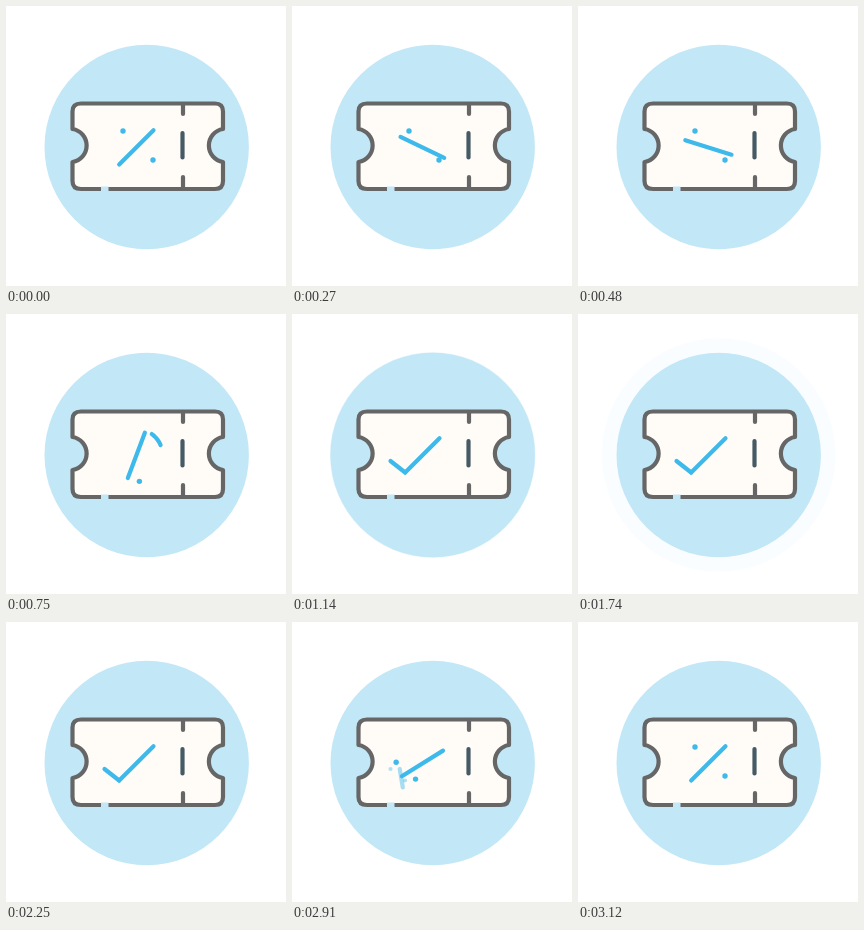
An HTML page for the animation above (4500 ms loop, 280x280 px).

```html
<!DOCTYPE html>
<html lang="en">
<head>
<meta charset="utf-8">
<title>Coupon check</title>
<style>
  html, body { margin: 0; height: 100%; overflow: hidden; background: #fff; }
  svg { display: block; width: 100vw; height: 100vh; }
  .disc { fill: #c2e7f7; }
  .ticket { fill: #fffcf7; stroke: #666; }
  .ink { fill: none; stroke: #3db9ec; }
  path { stroke-width: 4.2; stroke-linecap: round; stroke-linejoin: round; }
  .dot { fill: #3db9ec; }
</style>
</head>
<body>
<svg viewBox="0 0 280 280">
  <circle class="disc ripple" cx="140.7" cy="141"/>
  <circle class="disc ripple" cx="140.7" cy="141"/>
  <circle class="disc" cx="140.7" cy="141" r="102.2"/>
  <path class="ticket" d="M75 97.5H209Q217 97.5 217 105.5V123A16.7 16.7 0 0 0 217 156V175Q217 183 209 183H75Q66.5 183 66.5 175V156A16.7 16.7 0 0 0 66.5 123V105.5Q66.5 97.5 75 97.5Z"/>
  <path class="ticket" d="M177 98V108M177 171V182"/>
  <path d="M176.5 127V151.5" stroke="#455a64"/>
  <rect x="95" y="180.5" width="7.5" height="5" fill="#c2e7f7"/>
  <g id="ghosts"><circle class="dot" cx="98.5" cy="147" r="2.1"/><circle class="dot" cx="113" cy="158.5" r="2.1"/></g>
  <path id="leg" class="ink"/>
  <path id="slash" class="ink" d="M113.2 158.5L147.5 124.3"/>
  <circle class="dot mark" r="2.7"/>
  <circle class="dot mark" r="2.7"/>
</svg>
<script>
const LOOP = 4500, CX = 130.4, CY = 141.4;
const $ = s => document.querySelector(s);
const ripples = document.querySelectorAll('.ripple');
const marks = document.querySelectorAll('.mark');
const ghosts = $('#ghosts'), leg = $('#leg'), slash = $('#slash');

const lerp = (a, b, p) => a + (b - a) * p;
const mix = (a, b, p) => [lerp(a[0], b[0], p), lerp(a[1], b[1], p)];
const span = (t, a, b) => Math.min(1, Math.max(0, (t - a) / (b - a)));
const inOut = p => p < .5 ? 2 * p * p : 1 - 2 * (1 - p) ** 2;
const polar = (r, deg) => {
  const a = deg * Math.PI / 180;
  return [CX + r * Math.cos(a), CY + r * Math.sin(a)];
};

// cubic-bezier(.4, 0, .2, 1)
function swift(x) {
  let lo = 0, hi = 1, s = .5;
  for (let i = 0; i < 24; i++) {
    s = (lo + hi) / 2;
    const bx = 1.2 * (1 - s) ** 2 * s + .6 * (1 - s) * s * s + s ** 3;
    if (bx < x) lo = s; else hi = s;
  }
  return 3 * s * s - 2 * s ** 3;
}

const dotA = [117, 125], dotB = [147, 154];
const tip = [98.5, 147], corner = [113.2, 158.5];

function place(dot, [x, y], visible) {
  dot.setAttribute('cx', x);
  dot.setAttribute('cy', y);
  dot.setAttribute('opacity', visible ? 1 : 0);
}

// The upper dot swings round the slash, stretching into the short stroke.
function sweptLeg(t) {
  const h = inOut(span(t, 510, 1080)), q = inOut(span(t, 550, 1080));
  const out = span(t, 510, 690), late = span(t, 900, 1080) ** 2;
  const r = lerp(21.2, 26.3, out);
  const r0 = lerp(r, 24.3, late), r1 = lerp(r, 32.4, late);
  const a0 = lerp(230.5, 495.2, q), a1 = lerp(230.5, 530, h);
  const start = polar(r0, a0), end = polar(r1, a1);
  const points = [];
  for (let k = 0; k <= 1; k += .125) {
    points.push(mix(polar(lerp(r0, r1, k), lerp(a0, a1, k)), mix(start, end, k), late));
  }
  return 'M' + points.join('L');
}

function draw(t) {
  const fold = swift(span(t, 25, 1080)), back = span(t, 2715, 3120);
  const turn = 360 * (fold - inOut(back));
  slash.setAttribute('transform', `rotate(${turn} ${CX} ${CY})`);

  ripples.forEach((ring, i) => {
    const u = span(t, 1120 + 200 * i, 1630 + 200 * i);
    ring.setAttribute('r', 102 + 18 * u);
    ring.setAttribute('opacity', u > 0 ? .5 * (1 - u) : 0);
  });

  const swinging = t > 510 && t < 1080;
  leg.setAttribute('d', swinging ? sweptLeg(t) : `M${tip}L${corner}`);
  leg.setAttribute('opacity', t > 510 ? (1 - back) ** 1.2 : 0);
  leg.setAttribute('transform',
    `translate(${7 * back} ${7 * back}) rotate(${88 * back} 105.8 152.8)`);
  ghosts.setAttribute('opacity', back > 0 ? (1 - back) ** 1.4 : 0);

  if (t < 2730) {
    const p = inOut(span(t, 510, 1005));
    const r = lerp(lerp(20.9, 26.1, span(t, 510, 690)), 24.3, span(t, 850, 1005));
    place(marks[0], dotA, t <= 510);
    place(marks[1], t <= 510 ? dotB : polar(r, lerp(37.5, 135.2, p)), t < 1005);
  } else {
    const p = inOut(span(t, 2775, 3120));
    place(marks[0], mix(tip, dotA, p), true);
    place(marks[1], mix(corner, dotB, p), true);
  }
}

const began = performance.now();
function tick() {
  const t = (performance.now() - began) % LOOP;
  draw(Math.floor(t / 30) * 30);
  requestAnimationFrame(tick);
}
tick();
</script>
</body>
</html>
```
